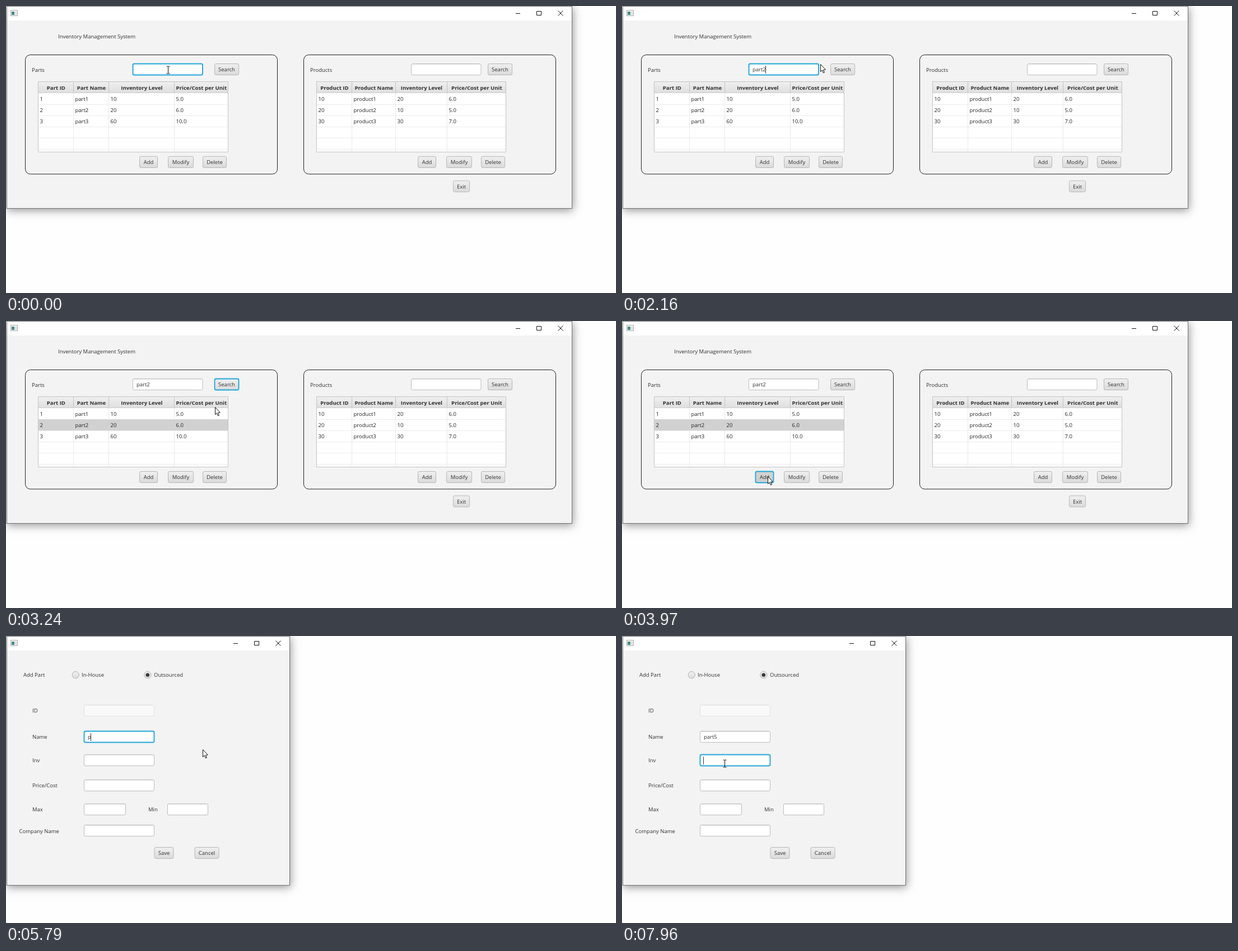
An HTML page with a canvas that plays this animation: 1089 by 514 pixels, repeating every 8 s.

```html
<!DOCTYPE html>
<html lang="en">
<head>
<meta charset="utf-8">
<title>Inventory Management System</title>
<style>
html, body { margin: 0; width: 100%; height: 100%; overflow: hidden; background: #fefefe; }
canvas { display: block; }
</style>
</head>
<body>
<canvas id="stage" width="1089" height="514"></canvas>
<script>
const ctx = document.getElementById('stage').getContext('2d');
const LOOP = 8000, TICK = 120.5, FORM_OPENS = 4090;
const FONT = '9.5px "Open Sans", "Noto Sans", sans-serif';
const BOLD = 'bold 9.6px "Open Sans", "Noto Sans", sans-serif';
const BLUE = '#20a6d8', INK = '#303030';

// Pointer path: time, x, y
const POINTER = [
  [0, 289, 114], [260, 289, 114], [580, 311, 91], [1920, 311, 91],
  [2400, 394, 117], [2640, 400, 115], [2770, 400, 115], [3000, 404, 120],
  [3610, 262, 275], [3730, 260, 278], [3980, 260, 278], [4090, 274, 253],
  [4450, 218, 183], [4810, 218, 183], [5050, 351, 203], [6750, 351, 203],
  [7110, 278, 282], [7470, 212, 224], [7720, 183, 228], [8000, 183, 228]
];
// Typed text: time, value
const SEARCH_TEXT = [[0, ''], [1070, 'p'], [1190, 'pa'], [1310, 'par'], [1550, 'part'], [1800, 'part2']];
const NAME_TEXT = [[0, ''], [5790, 'p'], [5910, 'pa'], [6030, 'par'], [6270, 'part'], [6760, 'part5']];
// Caret switches: time, visible
const CARET = [[0, 0], [480, 1], [950, 0], [1070, 1], [2280, 0], [4810, 1], [5300, 0], [5790, 1], [7250, 0], [7840, 1]];

const valueAt = (track, t) => track.filter(k => k[0] <= t).pop()[1];

function pointerAt(time) {
  const t = Math.floor((time + 12) / TICK) * TICK;
  const i = Math.max(1, POINTER.findIndex(k => k[0] > t));
  const [t0, x0, y0] = POINTER[i - 1], [t1, x1, y1] = POINTER[i];
  const u = Math.min(1, Math.max(0, (t - t0) / (t1 - t0)));
  return [Math.round(x0 + (x1 - x0) * u), Math.round(y0 + (y1 - y0) * u)];
}

function text(string, x, y, { align = 'left', font = FONT, color = INK } = {}) {
  ctx.font = font;
  ctx.textAlign = align;
  ctx.fillStyle = color;
  ctx.fillText(string, x, y);
}

function rect(x, y, w, h, color) {
  ctx.fillStyle = color;
  ctx.fillRect(x, y, w, h);
}

function line(x0, y0, x1, y1, color, width = 1) {
  ctx.strokeStyle = color;
  ctx.lineWidth = width;
  ctx.beginPath();
  ctx.moveTo(x0, y0);
  ctx.lineTo(x1, y1);
  ctx.stroke();
}

function box(x, y, w, h, radius, fill, stroke, width = 1) {
  ctx.beginPath();
  ctx.roundRect(x, y, w, h, radius);
  if (fill) { ctx.fillStyle = fill; ctx.fill(); }
  ctx.strokeStyle = stroke;
  ctx.lineWidth = width;
  ctx.stroke();
}

function fade(y, h, top, bottom) {
  const g = ctx.createLinearGradient(0, y, 0, y + h);
  g.addColorStop(0, top);
  g.addColorStop(1, bottom);
  return g;
}

function button(label, x, y, w, { focused, pressed } = {}) {
  const fill = pressed ? fade(y, 21, '#d4d4d4', '#cecece') : fade(y, 21, '#f0f0f0', '#dadada');
  if (focused) box(x + .5, y + .5, w - 1, 20, 2.5, fill, BLUE, 1.8);
  else box(x + .5, y + .5, w - 1, 20, 2.5, fill, '#b7b7b7');
  text(label, x + w / 2, y + 14, { align: 'center' });
}

function field(x, y, w, { value = '', focused, caret, disabled } = {}) {
  if (focused) {
    box(x + .5, y + .5, w - 1, 20, 2.5, '#fff', BLUE, 1.9);
  } else {
    box(x + .5, y + .5, w - 1, 20, 2.5, disabled ? '#f9f9f9' : '#fff', disabled ? '#e0e0e0' : '#bcbcbc');
    line(x + 2, y + 1.5, x + w - 2, y + 1.5, disabled ? '#f3f3f3' : '#e9e9e9');
  }
  text(value, x + 7, y + 14);
  if (caret) {
    const cx = Math.round(x + 7 + ctx.measureText(value).width) - .5;
    line(cx, y + 4, cx, y + 18, '#333');
  }
}

function radio(x, y, selected, focused) {
  ctx.beginPath();
  ctx.arc(x, y, 6.2, 0, 7);
  ctx.fillStyle = fade(y - 6, 12, '#f0f0f0', '#dddddd');
  ctx.fill();
  ctx.strokeStyle = focused ? BLUE : '#b2b2b2';
  ctx.lineWidth = focused ? 1.8 : 1;
  ctx.stroke();
  if (!selected) return;
  ctx.beginPath();
  ctx.arc(x, y, 3.3, 0, 7);
  ctx.fillStyle = '#3a3a3a';
  ctx.fill();
}

function appWindow(right, bottom) {
  ctx.save();
  ctx.shadowColor = 'rgba(0,0,0,.42)';
  ctx.shadowBlur = 15;
  ctx.shadowOffsetX = 1;
  ctx.shadowOffsetY = 3;
  rect(1, 0, right, bottom + 1, '#6f6f6f');
  ctx.restore();
  rect(2, 1, right - 2, 25, '#fff');
  rect(2, 26, right - 2, bottom - 26, '#f3f3f3');

  box(8.5, 7.5, 12, 10, 0, '#f4f4f4', '#a9a9a9');
  rect(10, 10, 5, 6, '#3f8f8c');
  rect(16, 10, 3, 6, '#dcdcdc');

  line(right - 100, 13.5, right - 92, 13.5, '#111');
  box(right - 62.5, 9.5, 8, 7, 0, null, '#111');
  line(right - 24.5, 8.5, right - 15.5, 17.5, '#111');
  line(right - 15.5, 8.5, right - 24.5, 17.5, '#111');
}

function table(edges, headers, rows, selected) {
  const left = edges[0], right = edges[4], top = 135, bottom = 261;
  rect(left, top, right - left, bottom - top, '#fff');
  rect(left, top, right - left, 21, fade(top, 21, '#f0f0f0', '#dedede'));
  if (selected >= 0) rect(left, 176 + 20 * (selected - 1), right - left, 20, '#d1d1d1');
  for (let y = 176.5; y < bottom; y += 20) line(left, y, right, y, '#ececec');
  if (selected >= 0) rect(left, 176 + 20 * (selected - 1), right - left, 20, '#d1d1d1');
  for (const x of edges.slice(1, 4)) {
    line(x, 156, x, bottom, '#e9e9e9');
    line(x, top, x, 156, '#c4c4c4');
  }
  if (selected >= 0) rect(left, 177 + 20 * (selected - 1), right - left, 19, '#d1d1d1');
  line(left, 155.5, right, 155.5, '#cfcfcf');
  box(left, top + .5, right - left, bottom - top, 0, null, '#c3c3c3');
  headers.forEach((h, i) => text(h, (edges[i] + edges[i + 1]) / 2 + .4, 150, { align: 'center', font: BOLD }));
  rows.forEach((row, r) => row.forEach((cell, i) =>
    text(cell, edges[i] + 3, 170 + 20 * r, { color: '#222' })));
}

function panel(x, title, searchX, search, searchButton, addButton) {
  box(x + .5, 87.5, 450, 213.5, 9, null, '#222');
  text(title, x + 12, 117.5);
  field(x + 192, 103, 125.5, search);
  button('Search', searchX, 103, 44, searchButton);
  button('Add', x + 204, 269, 33, addButton);
  button('Modify', x + 255, 269, 46);
  button('Delete', x + 317, 269, 43);
}

function mainScreen(t) {
  appWindow(1010, 362);
  text('Inventory Management System', 93, 58);
  const typing = t < 2760;
  panel(34, 'Parts', 372,
    { value: valueAt(SEARCH_TEXT, t), focused: typing, caret: typing && valueAt(CARET, t) },
    { focused: t >= 2760 && t < 3850, pressed: t >= 2760 && t < 2890 },
    { focused: t >= 3850, pressed: t >= 3970 });
  panel(531, 'Products', 860);
  table([57.5, 120.5, 183.5, 300.5, 396.5],
    ['Part ID', 'Part Name', 'Inventory Level', 'Price/Cost per Unit'],
    [['1', 'part1', '10', '5.0'], ['2', 'part2', '20', '6.0'], ['3', 'part3', '60', '10.0']],
    t >= 2890 ? 1 : -1);
  table([554.5, 617.5, 695.5, 787.5, 892.5],
    ['Product ID', 'Product Name', 'Inventory Level', 'Price/Cost per Unit'],
    [['10', 'product1', '20', '6.0'], ['20', 'product2', '10', '5.0'], ['30', 'product3', '30', '7.0']], -1);
  button('Exit', 798, 312.5, 30);
}

function formScreen(t) {
  appWindow(506, 446);
  text('Add Part', 31, 73);
  radio(124.3, 69.7, false);
  text('In-House', 135, 73);
  radio(252.8, 69.7, true, t < 4810);
  text('Outsourced', 264, 73);

  const caret = valueAt(CARET, t);
  const inName = t >= 4810 && t < 7840, inInv = t >= 7840;
  text('ID', 47, 136.5);
  field(139, 123, 126, { disabled: true });
  text('Name', 47, 184);
  field(139, 170, 126, { value: valueAt(NAME_TEXT, t), focused: inName, caret: inName && caret });
  text('Inv', 47, 226);
  field(139, 212, 126, { focused: inInv, caret: inInv && caret });
  text('Price/Cost', 47, 271);
  field(139, 257, 126);
  text('Max', 47, 314);
  field(139, 300, 75);
  text('Min', 254, 314);
  field(288, 300, 73);
  text('Company Name', 23.5, 352.5);
  field(139, 338, 126);
  button('Save', 264.5, 378, 35);
  button('Cancel', 336.5, 378, 44);
}

function overField(x, y, form) {
  const inside = (l, top, r) => x >= l && x <= r && y >= top && y <= top + 21;
  return form ? [170, 212, 257].some(top => inside(139, top, 265)) : inside(226, 103, 351);
}

function drawPointer(x, y, form) {
  ctx.save();
  ctx.translate(x, y);
  if (overField(x, y, form)) {
    line(.5, -6, .5, 7, '#111');
    for (const end of [-6, 7]) {
      line(-2.5, end, 0, end, '#111');
      line(1, end, 3.5, end, '#111');
    }
  } else {
    ctx.beginPath();
    for (const [px, py] of [[.5, .5], [.5, 13.6], [3.4, 10.9], [5.4, 15.8], [7.4, 15], [5.4, 10.3], [9.4, 10]])
      ctx.lineTo(px, py);
    ctx.closePath();
    ctx.fillStyle = '#fff';
    ctx.fill();
    ctx.strokeStyle = '#111';
    ctx.lineWidth = 1;
    ctx.stroke();
  }
  ctx.restore();
}

function frame() {
  const t = performance.now() % LOOP;
  const form = t >= FORM_OPENS;
  rect(0, 0, 1089, 514, '#fefefe');
  (form ? formScreen : mainScreen)(t);
  drawPointer(...pointerAt(t), form);
  requestAnimationFrame(frame);
}
frame();
</script>
</body>
</html>
```
